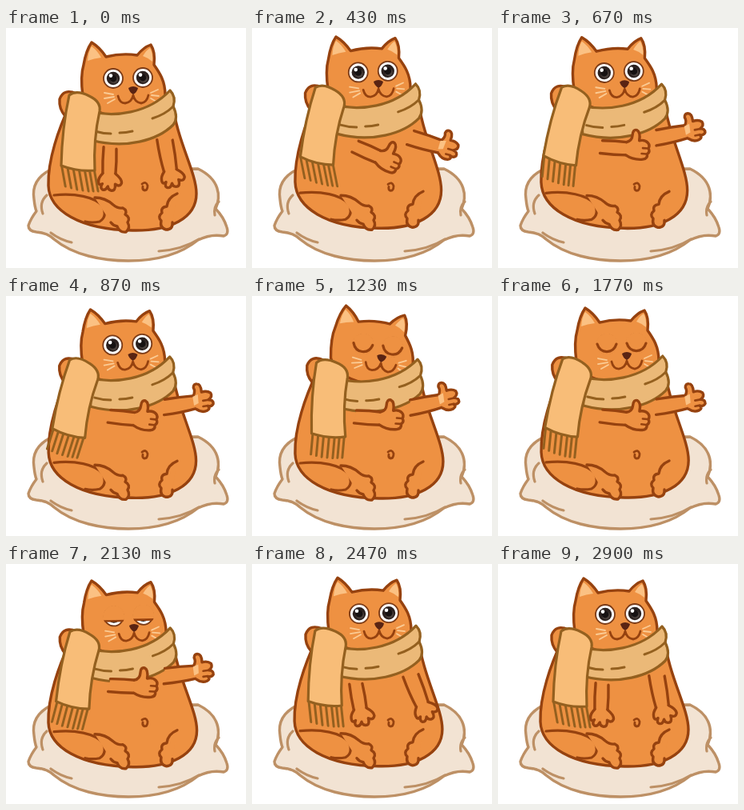
Recreate the animation shown at these times as an HTML page. Size 300 px wide and 300 px high, loop 2.93 s.

```html
<!DOCTYPE html>
<html lang="en">
<head>
<meta charset="utf-8">
<title>Cat on a pillow</title>
<style>
/* Pose channels, inherited by every moving part */
@property --x { syntax: "<number>"; inherits: true; initial-value: 0; }
@property --y { syntax: "<number>"; inherits: true; initial-value: 0; }
@property --tilt { syntax: "<angle>"; inherits: true; initial-value: 0deg; }
@property --swing { syntax: "<angle>"; inherits: true; initial-value: 0deg; }
@property --fringe { syntax: "<angle>"; inherits: true; initial-value: 8deg; }
@property --left { syntax: "<angle>"; inherits: true; initial-value: 92deg; }
@property --right { syntax: "<angle>"; inherits: true; initial-value: 79deg; }
@property --lid { syntax: "<length>"; inherits: true; initial-value: -30px; }
@property --fist { syntax: "<number>"; inherits: true; initial-value: 0; }
@property --shut { syntax: "<number>"; inherits: true; initial-value: 0; }

html, body { margin: 0; width: 100%; height: 100%; overflow: hidden; background: #fff; }
svg { display: block; width: 100vw; height: 100vh; }
path, circle { stroke-linecap: round; stroke-linejoin: round; }

.cat {
  animation: sway 2930ms infinite, arms 2930ms infinite, blink 2930ms linear infinite,
    grip 2930ms step-end infinite, shut 2930ms step-end infinite;
}
.fur { fill: #ee9142; stroke: #96420f; stroke-width: 3.4; }
.skin { fill: #ee9142; }
.line { fill: none; stroke: #96420f; stroke-width: 3.2; }
.wool { fill: #ebb978; stroke: #94601f; stroke-width: 3.2; }
.fold { fill: none; stroke: #94601f; stroke-width: 3; }
.linen { fill: #f2e3d3; stroke: #bd9065; stroke-width: 3.4; }
.crease { fill: none; stroke: #bd9065; stroke-width: 3.2; }
.peach { fill: #fbc183; }
.whisker { fill: none; stroke: #fbcb94; stroke-width: 1.8; }

.torso {
  transform-origin: 150px 253px;
  transform: translate(calc(var(--x) * .3px), calc(var(--y) * .35px))
    scale(calc(1 + var(--y) * .0016), calc(1 - var(--y) * .004));
}
.feet { transform: translateY(calc(var(--y) * .35px)); }
.head {
  transform-origin: 159px 77px;
  transform: translate(calc(var(--x) * 1px), calc(var(--y) * 1px)) rotate(var(--tilt));
}
.scarf {
  transform-origin: 155px 112px;
  transform: translate(calc(var(--x) * .4px), calc(var(--y) * 1px)) rotate(calc(var(--tilt) * .2));
}
.tail { transform-origin: 97px 90px; transform: rotate(var(--swing)); }
.fringe { transform-origin: 90px 175px; transform: skewX(var(--fringe)); }
.navel { transform: translateY(calc(var(--y) * -.4px)); }
.arm-l { transform: translate(130px, calc(151px + var(--y) * .3px)) rotate(var(--left)); }
.arm-r { transform: translate(198px, calc(140px + var(--y) * .3px)) rotate(var(--right)); }
.lid { transform: translateY(var(--lid)); }
.paw { opacity: calc(1 - var(--fist)); }
.fist { opacity: var(--fist); }
.shut { opacity: var(--shut); }

@keyframes sway {
  0%, 2%  { --x: 0; --y: 0; --tilt: 0deg; --swing: 0deg; --fringe: 8deg; animation-timing-function: ease-in; }
  14.7% { --x: -1; --y: -8; --tilt: -1deg; --swing: 6deg; --fringe: 15deg; animation-timing-function: ease-out; }
  18.8% { --x: -1; --y: -10; --tilt: -1.6deg; --swing: 9deg; --fringe: 6deg; animation-timing-function: ease-in-out; }
  29.7% { --x: -.5; --y: -2; --tilt: -1deg; --swing: 8deg; --fringe: -12deg; animation-timing-function: ease-in; }
  42%   { --x: 3; --y: 0; --tilt: 7deg; --swing: -4deg; --fringe: -10deg; animation-timing-function: ease-out; }
  48.5% { --x: 4; --y: -1; --tilt: 7deg; --swing: -5deg; --fringe: 6deg; animation-timing-function: ease-in; }
  54.6% { --x: 3; --y: -3; --tilt: 5deg; --swing: 1deg; --fringe: 8deg; animation-timing-function: linear; }
  60.4% { --x: 2; --y: -3; --tilt: 0deg; --swing: 8deg; --fringe: 0deg; animation-timing-function: ease-out; }
  72.7% { --x: 1; --y: 2; --tilt: -1deg; --swing: 5deg; --fringe: -12deg; animation-timing-function: ease-in-out; }
  82%   { --x: 0; --y: -1; --tilt: 0deg; --swing: -1deg; --fringe: 2deg; animation-timing-function: ease-in-out; }
  90%, 100% { --x: 0; --y: 0; --tilt: 0deg; --swing: 0deg; --fringe: 8deg; }
}
@keyframes arms {
  0%, 3%  { --left: 92deg; --right: 79deg; animation-timing-function: ease-in; }
  14.7% { --left: 24deg; --right: 16deg; animation-timing-function: ease-out; }
  19%   { --left: 3deg; --right: -13deg; animation-timing-function: ease-in-out; }
  29.7% { --left: 6deg; --right: -10deg; animation-timing-function: ease-in-out; }
  42%   { --left: 4deg; --right: -13deg; animation-timing-function: ease-in-out; }
  60.4% { --left: 6deg; --right: -10deg; animation-timing-function: ease-in-out; }
  73.5% { --left: 3deg; --right: -8deg; animation-timing-function: ease-in-out; }
  88%, 100% { --left: 92deg; --right: 79deg; }
}
@keyframes blink {
  0%, 33.5% { --lid: -30px; }
  37.5%, 70.5% { --lid: 2px; }
  72.7% { --lid: -8px; }
  76.5%, 100% { --lid: -30px; }
}
@keyframes grip { 0% { --fist: 0; } 10% { --fist: 1; } 82% { --fist: 0; } }
@keyframes shut { 0% { --shut: 0; } 37% { --shut: 1; } 71% { --shut: 0; } }
</style>
</head>
<body>
<svg viewBox="0 0 300 300">
  <defs>
    <clipPath id="socket"><circle r="13.4"/></clipPath>
    <g id="eye">
      <circle r="12" fill="#fff" stroke="#7a3a16" stroke-width="1.8"/>
      <circle r="8.2" fill="#2b211f"/>
      <circle r="5" cx="1" cy="1.5" fill="#4a403c"/>
      <circle r="4.4" fill="#171212"/>
      <circle r="2.3" cx="-3" cy="-3.4" fill="#fff"/>
      <g clip-path="url(#socket)">
        <path class="lid" d="M-18-18H18V14H-18Z" fill="#ee9142" stroke="#96420f" stroke-width="2.6"/>
      </g>
      <path class="shut line" d="M-12 0Q-9 9.5 0 9.5Q9 9.5 12 0"/>
    </g>
    <path id="paw" class="paw fur" d="M-1-8Q5-16 10-16Q16-14 12-8Q21-9 20-3Q19 1 15 1Q21 4 19 8Q17 11 12 8Q15 13 9 13Q4 13-1 8"/>
  </defs>

  <g>
    <path class="linen" d="M56 177C42 184 32 196 35 214Q36 224 38 229Q31 238 28 247Q28 254 38 255Q52 256 60 264C84 284 120 291 153 291C190 291 218 283 240 265Q256 257 272 260Q279 258 276 249Q272 236 262 226C269 210 267 189 240 176Z"/>
    <path class="crease" d="M51 209Q41 218 46 232M56 256Q68 265 82 268M266 217Q259 224 261 234M191 279Q220 277 241 264"/>
  </g>

  <g class="cat">
    <g class="scarf"><path class="fur" d="M88 82Q72 75 67 89Q66 101 74 110L94 112Z"/></g>

    <path class="torso fur" d="M80 96C66 125 52 165 53 197C54 228 92 252 158 253C205 254 238 238 238 207C238 180 213 140 208 92Z"/>

    <g class="feet">
      <path class="line" d="M60 209C85 206 112 211 121 223Q127 236 117 242Q108 244 99 242"/>
      <path class="fur" d="M111 212Q124 212 134 221Q140 226 146 225Q152 228 149 233Q156 237 152 243Q156 250 150 255Q142 256 139 248Q134 247 131 243"/>
      <path class="fur" d="M214 207Q202 212 201 223Q193 224 195 231Q189 236 194 241Q192 250 200 252Q209 252 208 243"/>
      <path class="navel line" d="M170 195Q175 191 177 197Q177 203 173 203Q170 202 171 198" style="stroke-width:2.8"/>
    </g>

    <g class="head">
      <path class="fur" d="M96 85C94 70 94 56 97 46Q100 28 107 18Q117 24 125 36Q145 31 164 34Q172 24 181 21Q187 30 185 46C192 56 199 66 199 84C196 118 108 122 96 85Z"/>
      <path class="peach" d="M102 41Q103 29 107 23Q114 28 119 37Q110 38 102 41ZM171 35Q176 27 180 25Q184 32 183 42Q177 37 171 35Z"/>
      <use href="#eye" x="134" y="63"/>
      <use href="#eye" x="171" y="62"/>
      <path class="line" d="M140 85Q142 94 149 94Q157 93 159 84Q161 93 169 94Q176 93 178 84" style="stroke-width:2.8"/>
      <path d="M153 75Q159 71 165 75Q164 80 159 83Q154 80 153 75Z" fill="#5a2413"/>
      <path class="whisker" d="M123 81L134 83M123 88L135 86M127 94L136 89M181 81L190 77M182 84L191 85M181 88L188 92"/>
    </g>

    <g class="scarf">
      <path class="wool" d="M104 104C135 112 178 107 205 78Q213 86 209 98Q216 112 209 121C190 140 150 152 106 140Z"/>
      <path class="fold" d="M111 129Q121 132 131 132M142 131Q150 131 158 129M183 113Q199 108 209 98"/>
      <g class="tail">
        <path class="fringe fold" d="M70 173L71 198M77 175L78 200M84 176L85 202M91 177L92 203M98 178L99 204M104 178L105 204M110 178L111 204"/>
        <path class="wool" d="M69 172Q70 125 79 84Q88 77 104 85Q119 92 117 104Q109 140 111 178Q90 180 69 172Z" style="fill:#f8bd78"/>
      </g>
    </g>

    <g class="arm-r">
      <path class="fur" d="M2-10Q20-10 40-8L40 8Q20 10-2 9"/>
      <g transform="translate(40)">
        <path class="skin" d="M-5-6H5V6H-5Z"/>
        <use href="#paw"/>
        <g class="fist">
          <path class="fur" d="M-2-8Q2-13 0-18Q1-23 5-22Q10-21 9-11Q16-12 20-8Q22-3 16 0Q22 1 21 6Q19 9 14 8Q17 11 12 13Q5 15-1 9"/>
          <path class="peach" d="M-3-7L4-9L3 2L-3 4Z"/>
          <path class="line" d="M9 0H16M8 7H14" style="stroke-width:2.6"/>
        </g>
      </g>
    </g>

    <g class="arm-l">
      <path class="fur" d="M0-8Q16-9 32-8L32 8Q16 9-2 8"/>
      <g transform="translate(32)">
        <path class="skin" d="M-5-6H5V6H-5Z"/>
        <use href="#paw"/>
        <g class="fist">
          <path class="fur" d="M-2-8Q5-10 5-17Q5-25 10-24Q15-22 14-11Q21-13 25-9Q28-6 26-2Q29 2 25 5Q26 11 20 12Q8 14-2 8"/>
          <path class="line" d="M19-2H25M18 5H24" style="stroke-width:2.6"/>
        </g>
      </g>
    </g>
  </g>
</svg>
</body>
</html>
```
